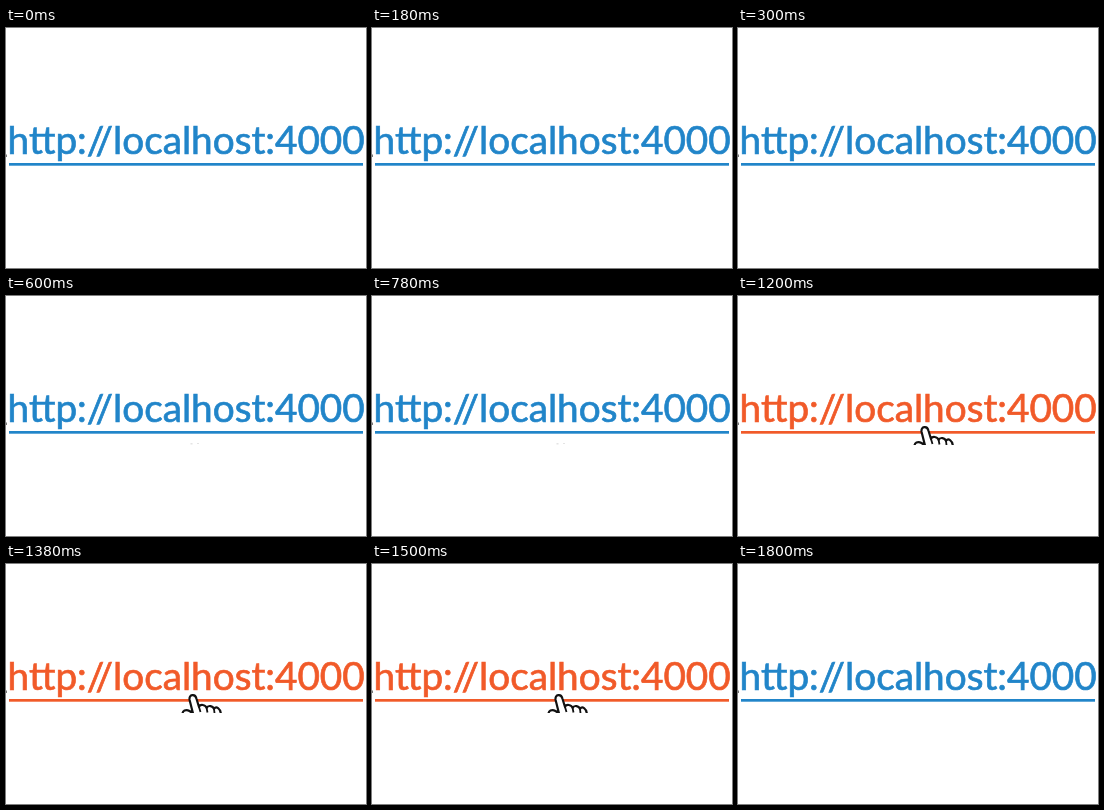
Write an HTML page with a canvas that moves like this. It is 360 by 240 pixels and loops after 2100 ms.

```html
<!DOCTYPE html>
<html lang="en">
<head>
<meta charset="utf-8">
<title>Link hover</title>
<style>
  html, body { margin: 0; width: 100%; height: 100%; overflow: hidden; background: #fff; }
  canvas { display: block; }
</style>
</head>
<body>
<canvas id="stage" width="360" height="240"></canvas>
<script>
const ctx = document.getElementById('stage').getContext('2d');
const LABEL = 'http://localhost:4000';
const LOOP = 2100, HINT = 600, ENTER = 900, LEAVE = 1800;
const LEFT = 3.6, RIGHT = 357, BASE = 126.4;
const BLUE = '#2185c9', ORANGE = '#f15a29';

const fontAt = size => `${size}px Lato, sans-serif`;
const hand = new Path2D(
  'M176.5 151 C176 146.5 180 145 183.5 147 L187 149.5 L183.6 136' +
  'C182.6 130 189.3 129.5 190.4 134.5 L193 143' +
  'C194 140 199.5 140.3 200.6 144 C202 141 207 141.5 208 145' +
  'C210 142 214.5 143.5 215 151');

// Choose the type size whose ink spans the underline.
function fitSize() {
  ctx.font = fontAt(100);
  const box = ctx.measureText(LABEL);
  return 100 * (RIGHT - LEFT) / (box.actualBoundingBoxLeft + box.actualBoundingBoxRight);
}

function drawLink(color) {
  ctx.fillStyle = ctx.strokeStyle = color;
  ctx.font = fontAt(size);
  const x = LEFT + ctx.measureText(LABEL).actualBoundingBoxLeft;
  ctx.fillText(LABEL, x, BASE);
  ctx.lineWidth = 0.7;
  ctx.strokeText(LABEL, x, BASE);
  ctx.fillRect(3, 135, 354, 2.7);
}

function drawHand() {
  ctx.save();
  ctx.beginPath();
  ctx.rect(0, 0, 360, 149);
  ctx.clip();
  ctx.fillStyle = '#fff';
  ctx.strokeStyle = '#111';
  ctx.lineWidth = 2.2;
  ctx.lineJoin = 'round';
  ctx.fill(hand);
  ctx.stroke(hand);
  // Creases between the fingers
  ctx.lineWidth = 1.8;
  ctx.stroke(new Path2D('M193 143 L194.5 148 M200.6 144 L201.5 148.5 M208 145 L208.5 149'));
  ctx.restore();
}

function draw(t) {
  const hover = t >= ENTER && t < LEAVE;
  ctx.fillStyle = '#fff';
  ctx.fillRect(0, 0, 360, 240);
  ctx.fillStyle = '#777';
  ctx.fillRect(0, 126.5, 1, 2.5);
  drawLink(hover ? ORANGE : BLUE);
  if (hover) drawHand();
  if (t >= HINT && t < ENTER) {
    ctx.fillStyle = '#e4e4e4';
    ctx.fillRect(184.5, 147, 2, 1.5);
    ctx.fillRect(191, 147, 2, 1);
  }
}

const size = fitSize();
const start = performance.now();
function tick() {
  draw((performance.now() - start) % LOOP);
  requestAnimationFrame(tick);
}
tick();
</script>
</body>
</html>
```
